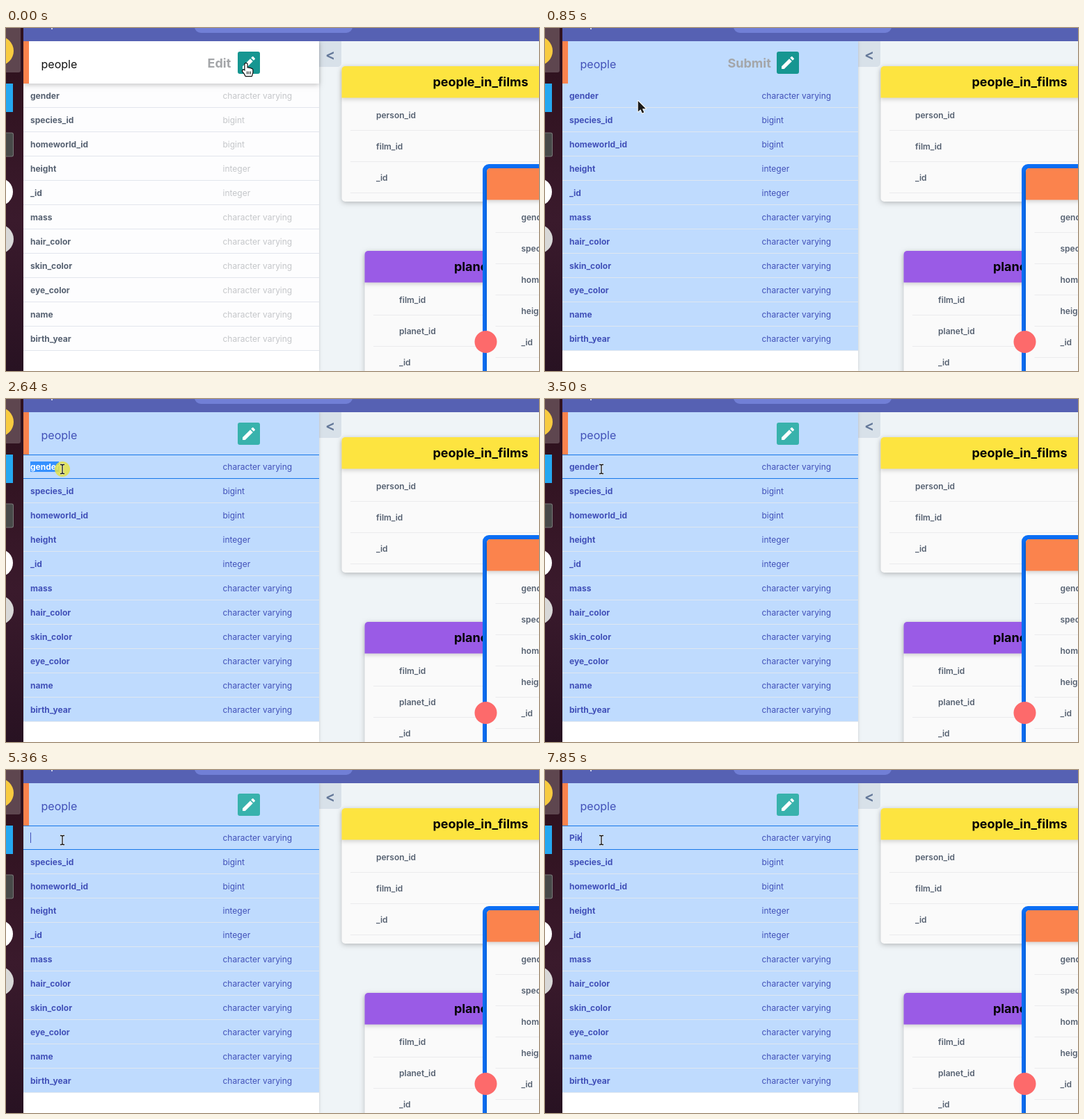
Write an HTML page with a canvas that moves like this. It is 766 by 494 pixels and loops after 8000 ms.

```html
<!DOCTYPE html>
<html>
<head>
<meta charset="utf-8">
<style>
html, body { margin: 0; width: 100%; height: 100%; overflow: hidden; }
canvas { display: block; }
</style>
</head>
<body>
<canvas id="stage" width="766" height="494"></canvas>
<script>
const c = document.getElementById('stage').getContext('2d');
const LOOP = 8000;
const INDIGO = '#4150b8', SLATE = '#566171', ORANGE = '#fb834d';

const VARYING = 'character varying';
const columns = [
  ['gender', VARYING], ['species_id', 'bigint'], ['homeworld_id', 'bigint'],
  ['height', 'integer'], ['_id', 'integer'], ['mass', VARYING],
  ['hair_color', VARYING], ['skin_color', VARYING], ['eye_color', VARYING],
  ['name', VARYING], ['birth_year', VARYING]
];

// [time, field text, caret visible]
const typing = [
  [0, 'gender', 0], [2870, 'gender', 1], [3500, 'gender', 0], [4110, 'gender', 1],
  [4260, 'gende', 1], [4510, 'gend', 1], [4740, 'gen', 1], [4810, 'ge', 0],
  [4980, 'g', 0], [5130, '', 0], [5360, '', 1], [5990, '', 0],
  [6140, 'O', 1], [6460, '', 0], [6690, '', 1],
  [7070, 'P', 1], [7550, 'Pi', 1], [7850, 'Pik', 1]
];

// [time, x, y] of the pointer hot spot
const pointer = [
  [0, 345, 51], [600, 345, 51], [770, 250, 106], [850, 134, 105],
  [930, 112, 104], [1080, 84, 101], [1240, 72, 100], [1980, 72, 100],
  [2090, 81, 101], [LOOP, 81, 101]
];
const clicks = [[1390, 1470], [1620, 1700], [2640, 2720]];

const pencil = new Path2D('M3 17.25V21h3.75L17.81 9.94l-3.75-3.75L3 17.25zM20.71 7.04c.39-.39.39-1.02 0-1.41l-2.34-2.34c-.39-.39-1.02-.39-1.41 0l-1.83 1.83 3.75 3.75 1.83-1.83z');
const arrow = new Path2D('M0 0V15.5L3.6 12.2L6 17.6L8.6 16.4L6.2 11.2H11Z');
const hand = new Path2D('M-1.5 1Q0-1 1.5 1V7Q3 5.5 4.2 7.2Q5.8 6 7 8Q9 7.2 9.3 9.5V13Q8.8 15 8 18H-.5Q-1.5 15-4.8 11.5Q-5.2 9.3-3.2 9.6L-1.5 11.3Z');
const beam = new Path2D('M-3-6.5H-1L0-5.5L1-6.5H3M0-5.5V5.5M-3 6.5H-1L0 5.5L1 6.5H3');

const clamp = v => Math.max(0, Math.min(1, v));
const ease = v => { v = clamp(v); return v * v * (3 - 2 * v); };
const mix = (a, b, k) => a + (b - a) * k;

function rect(x, y, w, h, color, radius = 0) {
  c.fillStyle = color;
  c.beginPath();
  c.roundRect(x, y, w, h, radius);
  c.fill();
}
function circle(x, y, r, color) {
  c.fillStyle = color;
  c.beginPath();
  c.arc(x, y, r, 0, 7);
  c.fill();
}
function text(str, x, y, size, weight, color, align = 'left') {
  c.font = `${weight} ${size}px Inter, sans-serif`;
  c.textAlign = align;
  c.fillStyle = color;
  c.fillText(str, x, y);
}
function shadowed(blur, dy, alpha, draw) {
  c.save();
  c.shadowColor = `rgba(0,0,0,${alpha})`;
  c.shadowBlur = blur;
  c.shadowOffsetY = dy;
  draw();
  c.restore();
}

function card(x, y, h, color, title, names) {
  shadowed(7, 2, .24, () => rect(x, y, 400, h, '#fafafa', 5));
  shadowed(5, 3, .14, () => rect(x, y, 400, 45.5, color, [5, 5, 0, 0]));
  text(title, x + 199.5, y + 29, 18, 700, '#050505', 'center');
  names.forEach((name, i) => {
    text(name, x + 49.5, y + 75 + i * 45, 12, 600, SLATE);
    rect(x + 12.5, y + 92 + i * 45, 390, 1, '#ebebed');
  });
}

function diagram() {
  rect(450, 19, 316, 475, '#eff4f7');
  card(482.5, 55, 195, '#fde440', 'people_in_films', ['person_id', 'film_id', '_id']);
  card(515.5, 321, 195, '#9a5be6', 'planets_in_films', ['film_id', 'planet_id', '_id']);
  rect(685, 196, 400, 400, '#0b70f8', 9);
  card(691, 202, 400, ORANGE, '', columns.slice(0, 5).map(col => col[0]));
  circle(689.5, 452, 16, '#fd6a6b');
  rect(450, 19, 32, 37, '#d8e1e9', [0, 0, 5, 0]);
  text('<', 466, 46, 21, 600, '#647899', 'center');
}

function dock() {
  const g = c.createLinearGradient(0, 64, 0, 494);
  g.addColorStop(0, '#30121f');
  g.addColorStop(.5, '#3a1a2c');
  g.addColorStop(1, '#281222');
  c.fillStyle = g;
  c.fillRect(0, 0, 25, 494);
  rect(0, 0, 21, 64, '#5e464f', [0, 0, 3, 0]);
  circle(-10, 33, 21, '#f8cb40');
  rect(-30, 80, 40, 41, '#25a8f1');
  rect(-25, 150.5, 36, 35, '#777', 3);
  rect(-25, 151.5, 35, 33, '#484a49', 2);
  circle(-10, 236, 20, '#fff');
  circle(-10, 304, 21, '#d8d8d7');
}

function topBar() {
  rect(25, 0, 741, 19, '#5661b3');
  rect(271, -20, 227, 27, '#717fd6', 9);
  rect(65, 0, 2, 2, '#c9cdea');
}

function panel(t) {
  const editing = t >= 230;
  const blue = '#bfdbfe';
  shadowed(4, 0, .18, () => rect(25, 19, 425, 475, '#fff'));
  rect(25, 80, 425, 385, editing ? blue : '#fdfdfe');
  shadowed(editing ? 0 : 7, 2, editing ? 0 : .22, () => rect(25, 19, 425, 61, editing ? blue : '#fff'));
  rect(25, 19, 8, 61, ORANGE);
  text('people', 50.5, 57.5, 16, 400, editing ? INDIGO : '#111');

  columns.forEach(([name, type], i) => {
    const y = 80 + i * 35;
    rect(25, y + 34, 425, 1, editing ? '#dfe7f0' : '#e2e5ed');
    if (i) text(name, 35, y + 22, 12, 700, editing ? INDIGO : SLATE);
    text(type, 311.5, y + 22, 12, 400, editing ? INDIGO : '#c4c6c9');
  });
  if (t >= 1010) {
    rect(25, 80, 425, 1, '#1677e8');
    rect(25, 114, 425, 1, '#1677e8');
  }
  field(t, editing);
  editButton(t, editing);
}

function field(t, editing) {
  const [, value, caret] = typing.findLast(step => step[0] <= t);
  const selected = t >= 1770 && t < 2870;
  c.font = '700 12px Inter, sans-serif';
  const width = c.measureText(value).width;
  if (selected) rect(35, 90, Math.floor(width), 15, '#3390ff');
  text(value, 35, 102, 12, 700, selected ? '#fff' : editing ? INDIGO : SLATE);
  if (caret) rect(Math.floor(35 + width), 90, 1, 15, INDIGO);
}

function editButton(t, editing) {
  const leave = ease((t - 860) / 360);
  c.globalAlpha = 1 - leave;
  const x = editing ? mix(290, 262.5, ease((t - 230) / 250)) + 27 * leave : 289.5;
  text(editing ? 'Submit' : 'Edit', x, 57, 18, 700, '#a4a6a9');
  c.globalAlpha = 1;
  const tone = [[22, 56], [150, 178], [145, 172]].map(([a, b]) => Math.round(mix(a, b, leave)));
  rect(333, 34, 32, 32, `rgb(${tone})`, 3);
  c.save();
  c.translate(337, 38);
  c.fillStyle = '#fff';
  c.fill(pencil);
  c.restore();
}

function cursor(t) {
  const i = pointer.findIndex(p => p[0] > t);
  const [t0, x0, y0] = pointer[i - 1], [t1, x1, y1] = pointer[i];
  const k = (t - t0) / (t1 - t0);
  const x = mix(x0, x1, k), y = mix(y0, y1, k);
  if (clicks.some(([on, off]) => t >= on && t < off)) circle(x, y, 11, 'rgba(228,226,70,.85)');
  c.save();
  c.translate(x, y);
  c.lineJoin = 'round';
  if (t >= 900) {
    c.lineWidth = 3;
    c.strokeStyle = 'rgba(255,255,255,.75)';
    c.stroke(beam);
    c.lineWidth = 1.3;
    c.strokeStyle = '#111';
    c.stroke(beam);
  } else if (t >= 620) {
    c.lineWidth = 2;
    c.strokeStyle = '#fff';
    c.stroke(arrow);
    c.fillStyle = '#1c1c1c';
    c.fill(arrow);
  } else {
    c.lineWidth = 2.4;
    c.strokeStyle = '#111';
    c.stroke(hand);
    c.fillStyle = '#fff';
    c.fill(hand);
    c.fillStyle = '#111';
    for (const dx of [1, 3.4, 5.8]) c.fillRect(dx, 11.5, 1, 4);
  }
  c.restore();
}

function frame() {
  const t = performance.now() % LOOP;
  diagram();
  panel(t);
  topBar();
  dock();
  cursor(t);
  requestAnimationFrame(frame);
}
frame();
</script>
</body>
</html>
```
